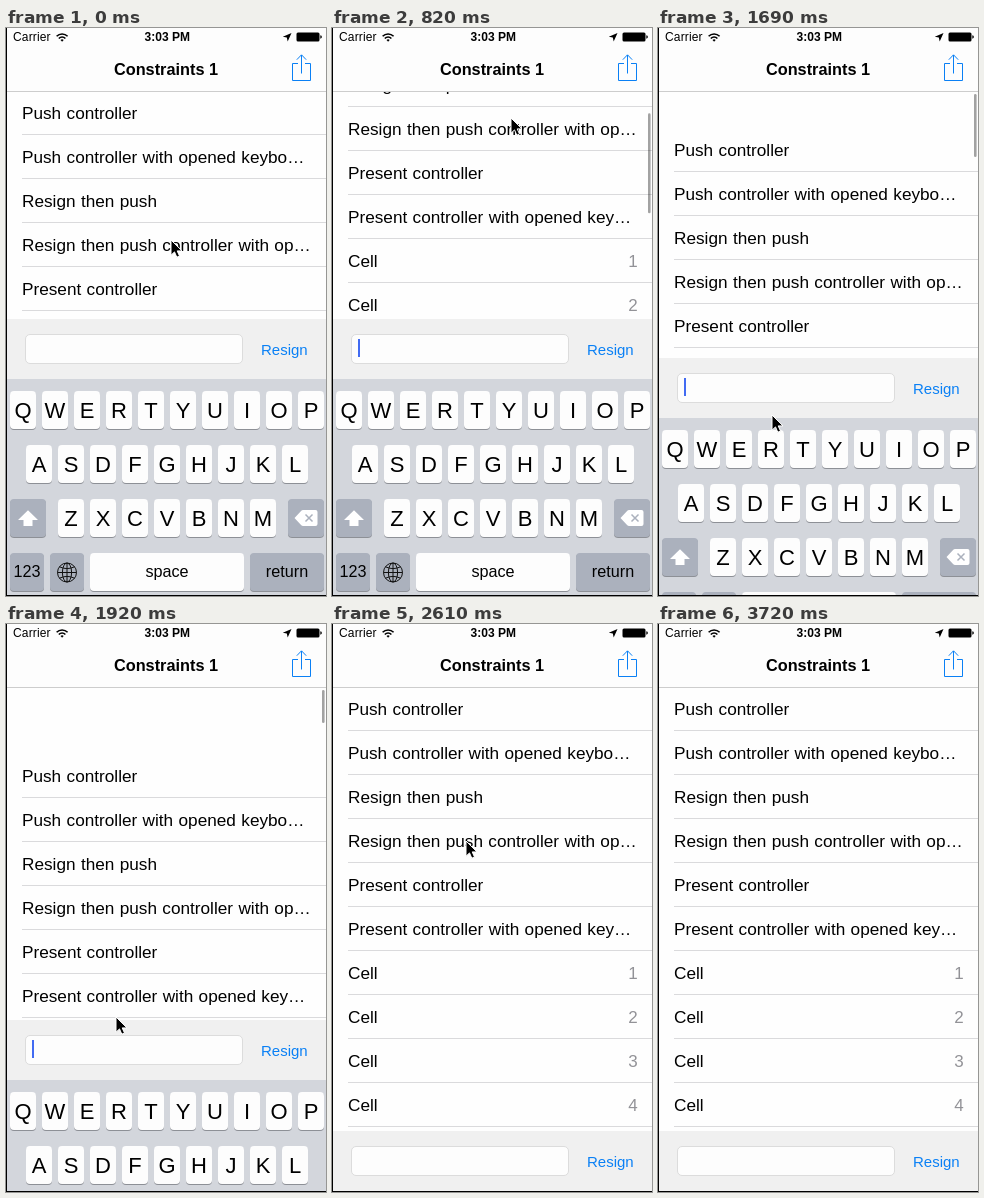
An HTML page for the animation above (5620 ms loop, 320 by 568 pixels).

```html
<!DOCTYPE html>
<html lang="en">
<head>
<meta charset="utf-8">
<title>Interactive keyboard dismissal</title>
<style>
  html, body { margin: 0; width: 100%; height: 100%; overflow: hidden; background: #fff; }
  svg { display: block; width: 320px; height: 568px; }
  text { font-family: "Liberation Sans", Arial, sans-serif; fill: #000; }
  .row { font-size: 17.2px; word-spacing: .6px; }
  .count { font-size: 17px; fill: #929297; text-anchor: end; }
  .sep { fill: #dadadc; }
  .letter { font-size: 22px; text-anchor: middle; }
  .word { font-size: 16.2px; text-anchor: middle; }
  .blue { fill: #0a80f5; }
  .line { fill: none; stroke: #0a80f5; }
</style>
</head>
<body>
<svg viewBox="0 0 320 568">
  <rect width="320" height="568" fill="#fefefe"/>
  <g id="table"></g>
  <rect id="thumb" x="316" width="2.6" rx="1.3" fill="#000" fill-opacity=".36"/>

  <g id="nav">
    <rect width="320" height="63" fill="#fdfdfd"/>
    <rect y="63" width="320" height="1" fill="#cdcdcd"/>
    <text x="7" y="13.4" font-size="12" letter-spacing=".15">Carrier</text>
    <g fill="none" stroke="#000" stroke-width="1.6">
      <path d="M50.6 8.3a7.8 7.8 0 0 1 11 0"/>
      <path d="M52.8 10.5a4.7 4.7 0 0 1 6.6 0"/>
    </g>
    <path d="M54.5 12.1a2.2 2.2 0 0 1 3.2 0l-1.6 1.7z"/>
    <text x="161.3" y="13.4" font-size="12" font-weight="bold" text-anchor="middle">3:03 PM</text>
    <path d="M285.5 5l-3.8 8.600-.9-4.100-4-.8z"/>
    <rect x="290.500" y="4.500" width="23" height="9" rx="1.500"/>
    <path d="M314.300 7.300q1.600 .3 1.600 1.700t-1.600 1.700z"/>
    <text x="160" y="47.2" font-size="16.3" font-weight="bold" text-anchor="middle">Constraints 1</text>
    <path class="line" d="M292 35.5h-5.5v17h18v-17h-5.5M295.5 45.5v-18.5M290.8 31.7l4.7-4.9 4.7 4.9"/>
  </g>

  <g id="dock">
    <rect y="291" width="320" height="60" fill="#f0f0f0"/>
    <rect x="19.5" y="306.5" width="217" height="29" rx="4.5" fill="#fdfdfd" stroke="#dcdcdc"/>
    <rect id="caret" x="26" y="311" width="2" height="18" fill="#426bf2"/>
    <text class="blue" x="255" y="326.5" font-size="15">Resign</text>
    <rect y="351" width="320" height="217" fill="#d3d6dc"/>
    <g id="keys"></g>
    <path fill="#fff" d="M22 482.3l10 9.7h-5.5v6h-9v-6h-5.5z"/>
    <path fill="#fff" d="M288.5 490l6.8-7.2q.7-.8 1.7-.8h12.5q2 0 2 2v12q0 2-2 2h-12.5q-1 0-1.7-.8z"/>
    <path fill="none" stroke="#abb1bd" stroke-width="1.5" d="M299.5 486.5l7 7m0-7l-7 7"/>
    <g fill="none" stroke="#111">
      <circle cx="61" cy="544.5" r="9.5"/>
      <ellipse cx="61" cy="544.5" rx="4.6" ry="9.5"/>
      <path d="M61 535v19M51.5 544.5h19M53.5 538.8q7.5 3.6 15 0M53.5 550.2q7.5-3.6 15 0"/>
    </g>
  </g>

  <path id="pointer" d="M0 0v15.2l3.5-3.3 2.3 5.3 2.7-1.2-2.3-5.1h4.8z" stroke="#fff"/>
  <rect width="1" height="568"/>
  <rect y="567" width="320" height="1"/>
</svg>

<script>
const LOOP = 5620, STEP = 57.5, RELEASE = 1855;
const $ = id => document.getElementById(id);

function add(parent, tag, attrs, text) {
  const el = document.createElementNS('http://www.w3.org/2000/svg', tag);
  for (const name in attrs) el.setAttribute(name, attrs[name]);
  if (text) el.textContent = text;
  parent.append(el);
}

// Table rows
const titles = ['Push controller', 'Push controller with opened keybo…', 'Resign then push',
  'Resign then push controller with op…', 'Present controller', 'Present controller with opened key…'];
for (let i = 0; i < 14; i++) {
  const y = 63 + 44 * i;
  add($('table'), 'text', { class: 'row', x: 16, y: y + 28 }, titles[i] || 'Cell');
  if (i > 5) add($('table'), 'text', { class: 'count', x: 305.6, y: y + 28 }, String(i - 5));
  add($('table'), 'rect', { class: 'sep', x: 16, y: y + 43, width: 304, height: 1 });
}

// Keyboard
function key(x, row, w, label, dark) {
  const y = 363 + 54 * row;
  const box = { x, width: w, height: 38, rx: 4 };
  add($('keys'), 'rect', { ...box, y: y + 1, fill: '#8d9096' });
  add($('keys'), 'rect', { ...box, y, fill: dark ? '#abb1bd' : '#fdfdfd' });
  const word = label.length > 1;
  add($('keys'), 'text', { class: word ? 'word' : 'letter', x: x + w / 2, y: y + (word ? 24 : 27) }, label);
}
['QWERTYUIOP', 'ASDFGHJKL', 'ZXCVBNM'].forEach((letters, row) =>
  [...letters].forEach((c, i) => key(177 + 32 * (i - letters.length / 2) - 13, row, 26, c)));
key(4, 2, 36, '', true);
key(282, 2, 36, '', true);
key(4, 3, 34, '123', true);
key(44, 3, 34, '', true);
key(84, 3, 154, 'space');
key(244, 3, 74, 'return', true);

// Motion helpers
const ramp = (t, from, to) => Math.min(1, Math.max(0, (t - from) / (to - from)));
const smooth = u => u * u * (3 - 2 * u);
const ease = (t, from, to) => smooth(ramp(t, from, to));

// Pointer stops: time, x, y
const stops = [[75, 165, 212], [520, 178, 96], [760, 179, 90], [820, 179, 90], [1160, 148, 198],
  [1280, 148, 198], [RELEASE, 105, 434], [2090, 134, 217], [2980, 134, 217], [3320, 122, 443],
  [3500, 122, 443], [3700, 192, 570]];

function pointerAt(t) {
  let [, x, y] = stops[0];
  for (let i = 1; i < stops.length; i++) {
    const u = ease(t, stops[i - 1][0], stops[i][0]);
    x += u * (stops[i][1] - stops[i - 1][1]);
    y += u * (stops[i][2] - stops[i - 1][2]);
  }
  return [x, y];
}

// Drag up, drag down with rubber band, then a damped spring back
function scrollAt(t, y) {
  if (t < 520) return 212 - y;
  if (t < 1280) return 116;
  if (t < RELEASE) {
    const pull = 314 - y;
    return pull < 0 ? .51 * pull : pull;
  }
  const u = (t - RELEASE) / 100;
  return -(61 + 103 * u) * Math.exp(-u);
}

// The keyboard follows the finger, then slides out
function dockAt(t, y) {
  if (t < 1280) return 0;
  if (t < RELEASE) return Math.max(0, y - 348);
  return 86 + 130 * ease(t, RELEASE, 2125);
}

function draw(now) {
  const time = now % LOOP;
  const t = Math.max(0, 22.5 + STEP * Math.floor((time - 22) / STEP));
  const [x, y] = pointerAt(t);
  const scroll = Math.round(scrollAt(t, y));
  const over = Math.max(0, -scroll);
  const open = ramp(t, 1920, 2150);
  const shown = ramp(t, 60, 120) - ramp(t, 820, 1160) + ramp(t, 1270, 1330) - ramp(t, 2250, 2500);
  $('table').setAttribute('transform', `translate(0 ${-scroll})`);
  $('dock').setAttribute('transform', `translate(0 ${Math.round(dockAt(t, y))})`);
  $('pointer').setAttribute('transform', `translate(${Math.round(x)} ${Math.round(y)})`);
  $('thumb').setAttribute('y', 66 + Math.max(0, scroll) / 6 + over * open);
  $('thumb').setAttribute('height', 100 + 45 * open - over);
  $('thumb').setAttribute('opacity', shown);
  $('caret').setAttribute('opacity', t < 2000 && t % 1000 > 300 ? 1 : 0);
}

let begin;
function tick(now) {
  begin ??= now;
  draw(now - begin);
  requestAnimationFrame(tick);
}
draw(0);
requestAnimationFrame(tick);
</script>
</body>
</html>
```
